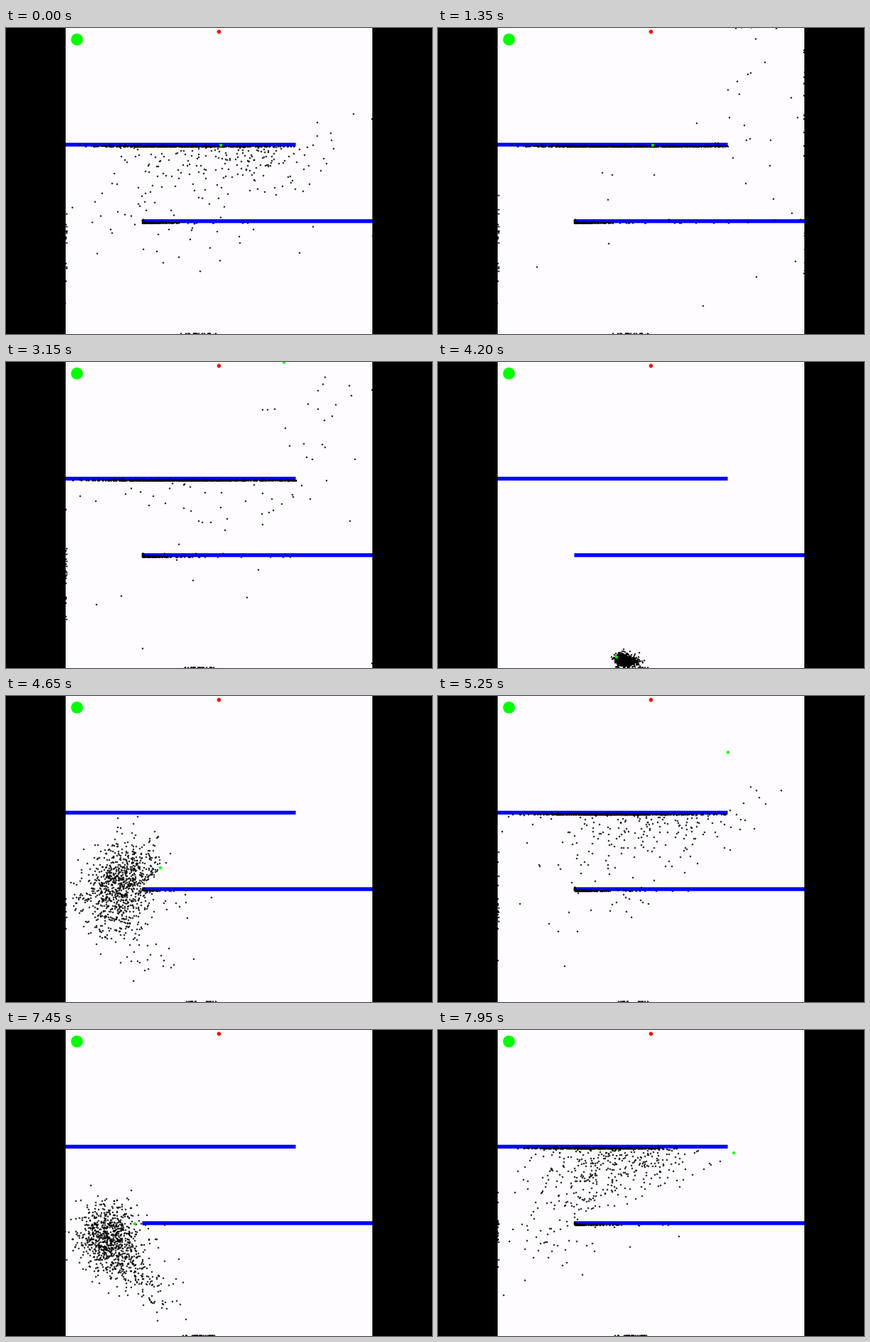
Animation of 600 by 432 pixels, one loop 8000 ms. Source, as a matplotlib script:

```python
import numpy as np
import matplotlib.pyplot as plt
from matplotlib.animation import FuncAnimation
from matplotlib.patches import Circle, Rectangle

W, H, DPI = 600, 432, 100
FRAMES, INTERVAL = 160, 50
LEFT, RIGHT = 84, 516
BARS = [(84, 162, 324, 5.4), (192, 270, 324, 5.4)]   # x, y, width, height
POPULATION = 1000
SUB = 10                      # physics steps per frame
LIFE = 51                     # frames until the whole generation rests
AGE = np.arange(LIFE * SUB + 1) / SUB

# Route of the best dot as (age, x, y)
ROUTE = [(0, 300, 426.6), (1.8, 255, 420), (7, 145, 305), (11, 217, 241.5),
         (14, 291.5, 207.5), (19, 416, 172.5), (22, 430, 105)]

# First frame of each generation and the route its best dot takes
GENERATIONS = [
    (-24, ROUTE[:5] + [(16, 302, 165)]),
    (31, ROUTE + [(26, 391, 0)]),
    (82, ROUTE + [(26, 343, 0)]),
    (140, ROUTE + [(26, 391, 0)]),
]


def along(route, age):
    """Points on a route at the given ages."""
    ages, xs, ys = np.transpose(route)
    return np.stack([np.interp(age, ages, xs), np.interp(age, ages, ys)], axis=-1)


def swarm_paths(rng):
    """Dots trail the route at their own pace, with scatter and random walk."""
    pace = 0.93 - 0.085 * rng.gamma(2.2, 1, (POPULATION, 1))
    progress = np.maximum(pace, 0.3) * AGE
    shortcut = 0.2 * np.minimum(progress, 14) ** 2
    scatter = 1.5 * rng.standard_t(5, (POPULATION, 1, 2)) * AGE[:, None]
    push = 0.7 * rng.normal(0, SUB ** -0.5, (POPULATION, len(AGE), 2))
    walk = push.cumsum(axis=1).cumsum(axis=1) / SUB
    return along(ROUTE + [(26, 391, 0)], progress) - shortcut[..., None] + scatter + walk


def crashed(paths):
    x, y = paths[..., 0], paths[..., 1]
    hit = (x < LEFT + 1) | (x > RIGHT - 1) | (y < 1) | (y > H - 1)
    for left, top, width, height in BARS:
        hit |= (x > left) & (x < left + width) & (y > top) & (y < top + height)
    return hit


def simulate(seed):
    """Dot positions per frame, each frozen at its first collision."""
    paths = swarm_paths(np.random.default_rng(seed))
    hit = crashed(paths)
    hit[:, -1] = True
    stop = hit.argmax(axis=1)
    rows = np.arange(POPULATION)
    return [paths[rows, np.minimum(age * SUB, stop)] for age in range(LIFE + 1)]


RUNS = [simulate(seed) for seed in range(len(GENERATIONS))]

fig = plt.figure(figsize=(W / DPI, H / DPI), dpi=DPI, facecolor="black")
ax = fig.add_axes([0, 0, 1, 1])
ax.set_xlim(0, W)
ax.set_ylim(H, 0)
ax.axis("off")


def box(x, y, width, height, color):
    ax.add_patch(Rectangle((x, y), width, height, color=color, lw=0, snap=False))


def disc(x, y, radius, color):
    ax.add_patch(Circle((x, y), radius, color=color, lw=0))


def dots(diameter, color, zorder):
    size = (diameter * 72 / DPI) ** 2
    return ax.scatter([], [], s=size, c=color, linewidths=0, zorder=zorder)


box(LEFT, 0, RIGHT - LEFT, H, "#fefcff")
for bar in BARS:
    box(*bar, "#0000ff")
disc(300, 5.4, 2.8, "#ff0000")
disc(100, 16.2, 8.4, "#00ff00")
swarm = dots(2.3, "black", 3)
leader = dots(4.3, "#00ff00", 4)


def update(frame):
    index = max(i for i, (start, _) in enumerate(GENERATIONS) if start <= frame)
    start, route = GENERATIONS[index]
    age = frame - start
    swarm.set_offsets(RUNS[index][min(age, LIFE)])
    leader.set_offsets([along(route, age)])
    return swarm, leader


anim = FuncAnimation(fig, update, frames=FRAMES, interval=INTERVAL,
                     repeat=True, repeat_delay=0)
plt.show()
```
